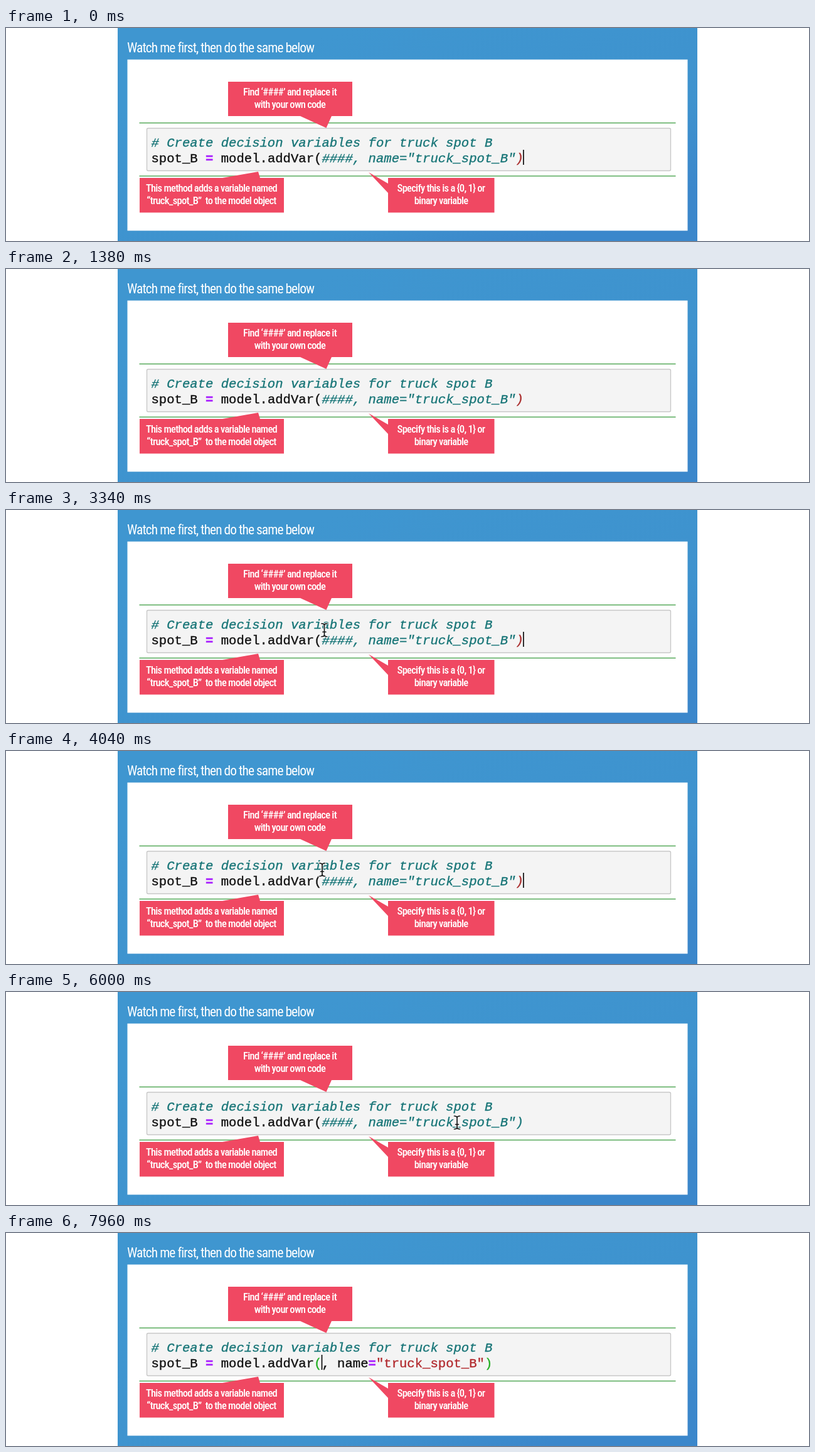
An HTML page for the animation above (8000 ms loop, 1280 by 341 pixels).

```html
<!DOCTYPE html>
<html lang="en">
<head>
<meta charset="utf-8">
<title>Code lesson</title>
<style>
html, body { margin: 0; width: 100%; height: 100%; overflow: hidden; background: #fff; }
svg { display: block; width: 100vw; height: 100vh; }
.label { font-family: Roboto, sans-serif; font-stretch: 75%; letter-spacing: -.045em; fill: #fff; }
#head { font-size: 100px; }
.tip { text-anchor: middle; font-weight: 500; }
.box { fill: #f04862; }
.code { font: 20.6px "Liberation Mono", monospace; white-space: pre; fill: #111; stroke: #111; stroke-width: .35px; }
.note { fill: #177577; stroke: #177577; font-style: italic; }
.op { fill: #a2f; stroke: #a2f; font-weight: bold; }
.str { fill: #b22a2e; stroke: #b22a2e; }
.bad { fill: #a92b2b; stroke: #a92b2b; }
.match { fill: #1fae1f; stroke: #1fae1f; }
</style>
</head>
<body>
<svg viewBox="0 0 1280 341" preserveAspectRatio="none">
  <defs>
    <linearGradient id="sky" gradientUnits="userSpaceOnUse" x1="540" y1="0" x2="690" y2="405">
      <stop offset="0" stop-color="#3f96d0"/>
      <stop offset=".7" stop-color="#3e92ce"/>
      <stop offset="1" stop-color="#3b87cb"/>
    </linearGradient>
    <path id="ibeam" d="M-4.5 -10.500Q0 -10.500 0 -7.500Q0 -10.500 4.500 -10.500M0 -7.500V7.500M-4.500 10.500Q0 10.500 0 7.500Q0 10.500 4.500 10.500M-2.500 3H2.500"/>
  </defs>
  <rect x="178" width="924" height="341" fill="url(#sky)"/>
  <text id="head" class="label" x="193" y="39">Watch me first, then do the same below</text>
  <rect x="193.5" y="50.5" width="893" height="274" fill="#fff"/>
  <path d="M212.500 152H1067.500M212.500 237H1067.500" stroke="#58ab5c" stroke-width="1.5"/>
  <rect x="224.5" y="160.5" width="835" height="68" rx="2" fill="#f4f4f4" stroke="#c6c6c6" stroke-width="1.3"/>

  <path class="box" d="M354 86H552V141H519L510.500 160L469 141H354Z"/>
  <path class="box" d="M213 240H345L402 230L405 240H443V295.500H213Z"/>
  <path class="box" d="M609 240H778.500V295.500H609V264L578 231L609 249Z"/>
  <g class="label tip">
    <text x="452.5" y="108">Find ‘####’ and replace it</text>
    <text x="452.5" y="128">with your own code</text>
    <text x="327.5" y="262">This method adds a variable named</text>
    <text x="327.5" y="282">“truck_spot_B”&nbsp; to the model object</text>
    <text x="693.5" y="262">Specify this is a {0, 1} or</text>
    <text x="693.5" y="282">binary variable</text>
  </g>

  <text class="code note" x="231.5" y="189.8"># Create decision variables for truck spot B</text>
  <text class="code" id="line" x="231.5" y="214.8"></text>
  <rect id="caret" y="195" width="1.6" height="24" fill="#000"/>
  <g id="beam" fill="none" stroke-linecap="round">
    <use href="#ibeam" stroke="#fff" stroke-width="3.4"/>
    <use href="#ibeam" stroke="#111" stroke-width="1.7"/>
  </g>
</svg>
<script>
const LOOP = 8000, CHAR = 12.36, LEFT = 232, OPEN = 22, BLINK = 530;
const CLICK = 5150;
const DELETES = [6900, 7130, 7360, 7590];
// pointer path: time, x, y
const PATH = [
  [2300, 540, 208], [2600, 524, 203], [2900, 524, 203], [3500, 504, 190],
  [4250, 504, 190], [4850, 559, 212], [5400, 559, 212], [5900, 719, 209], [LOOP, 719, 209]
];
const FACES = ['Roboto', 'Roboto Condensed', 'Open Sans', 'Open Sans Condensed', 'Noto Sans', 'Liberation Sans Narrow'];
const $ = id => document.getElementById(id);
const span = (cls, text) => `<tspan class="${cls}">${text}</tspan>`;
const show = (el, on) => el.setAttribute('visibility', on ? 'visible' : 'hidden');

// labels use the narrowest installed face, sized from its own proportions
function setLabels() {
  const head = $('head'), tip = document.querySelector('.tip');
  const widthIn = face => {
    head.style.fontFamily = `"${face}", Roboto, sans-serif`;
    return head.getComputedTextLength();
  };
  const face = FACES.reduce((a, b) => widthIn(b) < widthIn(a) ? b : a);
  const size = 298 * 100 / widthIn(face);
  head.style.fontSize = size + 'px';
  tip.style.fontFamily = head.style.fontFamily;
  tip.style.fontSize = size * .77 + 'px';
}

function codeLine(hashes, bad) {
  const start = 'spot_B ' + span('op', '=') + ' model.addVar';
  if (!hashes) {
    return start + span('match', '(') + ', name' + span('op', '=') +
      span('str', '"truck_spot_B"') + span('match', ')');
  }
  const rest = '#'.repeat(hashes) + ', name="truck_spot_B"';
  return start + '(' + span('note', rest) + span(bad ? 'note bad' : 'note', ')');
}

function pointerAt(t) {
  const i = PATH.findIndex(p => p[0] > t);
  if (i < 1) return null;
  const [t0, x0, y0] = PATH[i - 1], [t1, x1, y1] = PATH[i];
  const u = (t - t0) / (t1 - t0), k = u * u * (3 - 2 * u);
  return [x0 + (x1 - x0) * k, y0 + (y1 - y0) * k];
}

let shown = '';
function draw(now) {
  const t = now % LOOP;
  const gone = DELETES.filter(d => t >= d).length;
  const clicked = t >= CLICK;

  const text = codeLine(4 - gone, !clicked);
  if (text !== shown) $('line').innerHTML = shown = text;

  // the blink restarts at the click and at each key press
  const since = gone ? DELETES[gone - 1] : clicked ? CLICK : 780 - 2 * BLINK;
  const col = clicked ? OPEN + 4 - gone : OPEN + 26;
  $('caret').setAttribute('x', LEFT + CHAR * col - 1.2);
  show($('caret'), (t - since) % (2 * BLINK) < BLINK);

  const p = gone ? null : pointerAt(t);
  show($('beam'), p);
  if (p) $('beam').setAttribute('transform', `translate(${p[0]} ${p[1]})`);
}

function tick() {
  draw(performance.now());
  requestAnimationFrame(tick);
}
setLabels();
tick();
</script>
</body>
</html>
```
